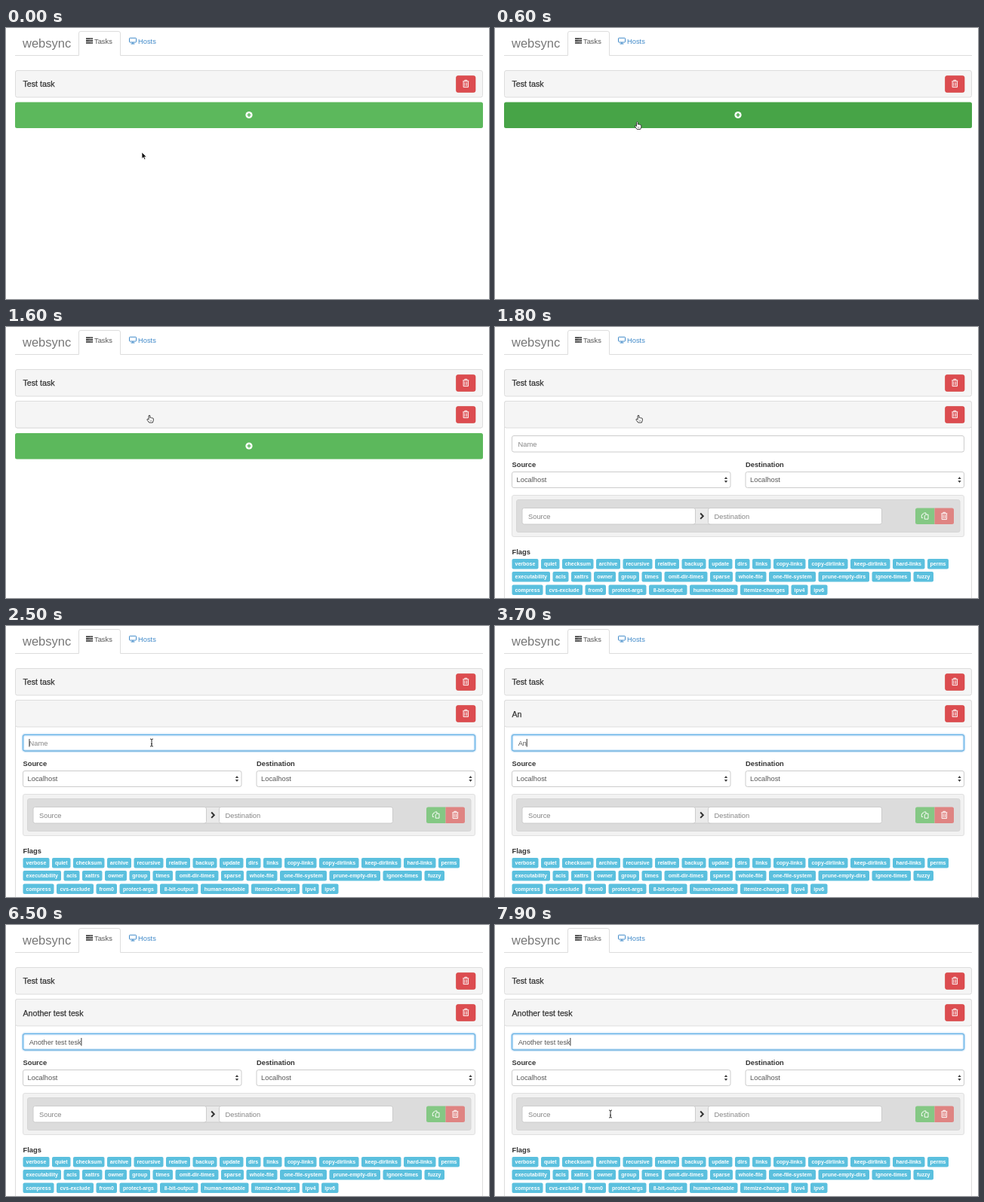
Recreate the animation shown at these times as an HTML page. Size 640 by 360 pixels, loop 8000 ms.

```html
<!DOCTYPE html>
<html lang="en">
<head>
<meta charset="utf-8">
<title>websync</title>
<style>
html, body { margin: 0; width: 100%; height: 100%; overflow: hidden; background: #fff; }
svg { display: block; }
text { font-family: "Liberation Sans", Arial, sans-serif; white-space: pre; }
</style>
</head>
<body>
<svg id="stage" width="100%" height="100%" viewBox="0 0 640 360"></svg>
<script>
const LOOP = 8000, FRAME = 100, BODY_TOP = 134, BODY_HEIGHT = 330;
const GREEN = '#5cb85c', GREEN_HOVER = '#47a447', RED = '#dc4c50', BORDER = '#ddd';

const TITLE = 'Another test tesk';
const KEY_TIMES = [3300, 3700, 3900, 4000, 4200, 4300, 4500, 4600, 4800,
  5000, 5200, 5300, 5700, 5900, 6100, 6300, 6500];
const FOCUS_TIME = 2300, CARET_TIME = 2600;

// Each flag row: top, names, left edges followed by the right end
const FLAGS = [
  [308, 'verbose quiet checksum archive recursive relative backup update dirs links copy-links copy-dirlinks keep-dirlinks hard-links perms',
    [22.5, 61, 89, 134, 169.5, 212, 247.5, 283, 318, 341, 369, 415, 471, 527, 573, 604.5]],
  [325, 'executability acls xattrs owner group times omit-dir-times sparse whole-file one-file-system prune-empty-dirs ignore-times fuzzy',
    [22.5, 76.5, 101, 131, 163.5, 194.5, 224.5, 285, 318.5, 363, 428.5, 499.5, 554.5, 584.5]],
  [342.5, 'compress cvs-exclude from0 protect-args 8-bit-output human-readable itemize-changes ipv4 ipv6',
    [22.5, 67, 119.5, 150.5, 204, 258, 325, 392.5, 418, 444]]
];

const rect = (x, y, w, h, fill, stroke = 'none', rx = 2.5, more = '') =>
  `<rect x="${x}" y="${y}" width="${w}" height="${h}" rx="${rx}" fill="${fill}" stroke="${stroke}" ${more}/>`;
const text = (x, y, str, size = 9.33, fill = '#555', more = '') =>
  `<text x="${x}" y="${y}" font-size="${size}" fill="${fill}" ${more}>${str}</text>`;
const path = (d, fill, stroke = 'none', width = 1, more = '') =>
  `<path d="${d}" fill="${fill}" stroke="${stroke}" stroke-width="${width}" ${more}/>`;
const group = (x, y, inner, more = '') => `<g transform="translate(${x} ${y})" ${more}>${inner}</g>`;

const label = (x, y, str) => text(x, y, str, 9.33, '#333', 'font-weight="bold"');
const heading = (y, str, id = '') =>
  text(22.5, y, str, 10.67, '#333', `stroke="#333" stroke-width=".25" id="${id}"`);
const field = (x, y, w, hint) => rect(x, y, w, 21.5, '#fff', '#ccc') + text(x + 8, y + 14, hint, 9.33, '#858585');

const trash = (x, y) => group(x, y,
  path('M-4 -3.2H4M-1.5 -3.4V-4.7H1.5V-3.4M-3.2 -2.8V4.6H3.2V-2.8M-1.2 -1.5V3.3M1.2 -1.5V3.3', 'none', '#fff', 0.95));
const trashButton = y => rect(596.5, y, 25.5, 22, RED, '#d43f3a', 2.5, 'stroke-width=".6"') + trash(609.3, y + 10.5);

const select = x => rect(x, 192.5, 289.5, 21, '#fff', '#ccc') + text(x + 6, 206, 'Localhost') +
  group(x + 283.5, 203, path('M-2.2 -1L0 -4L2.2 -1ZM-2.2 1L0 4L2.2 1Z', '#444'));

const flags = FLAGS.map(([y, names, edges]) => names.split(' ').map((name, i) => {
  const w = edges[i + 1] - edges[i] - 3.5;
  return rect(edges[i], y, w, 13.5, '#5bc0de', 'none', 2) +
    text(edges[i] + w / 2, y + 9.2, name, 7, '#fff', 'font-weight="bold" text-anchor="middle"');
}).join('')).join('');

const header =
  path('M12 36.5H96.5V7Q96.5 4.5 99 4.5H149Q151.5 4.5 151.5 7V36.5H632', 'none', BORDER) +
  text(22, 26, 'websync', 16.5, '#777') +
  path('M106 14.2H115M106 17H115M106 19.8H115', 'none', '#444', 2) +
  path('M111 14.2H114M109.5 17H114M112 19.8H114', 'none', '#999', 0.6) +
  text(117, 20.5, 'Tasks') +
  rect(163.5, 13.3, 9, 5.7, 'none', '#428bca', 0.8) + path('M165.5 21H170.5M168 19V21', 'none', '#428bca', 1.2) +
  text(175, 20.5, 'Hosts', 9.33, '#428bca');

const panelHead = y => rect(12.5, y, 619, 35.5, '#f5f5f5', BORDER) + trashButton(y + 7);

const form =
  field(22.5, 144.5, 599, '<tspan id="hint">Name</tspan>') +
  `<g id="focus">${rect(22.5, 144.5, 599, 21.5, 'none', '#66afe9', 3, 'stroke-width="4" opacity=".3"')}
  ${rect(22.5, 144.5, 599, 21.5, 'none', '#5aaee6')}</g>` +
  text(30.7, 158.5, '', 9.2, '#555', 'id="typed"') + rect(0, 150, 0.9, 10.5, '#222', 'none', 0, 'id="caret"') +
  label(22.5, 185.5, 'Source') + label(332, 185.5, 'Destination') + select(22.5) + select(332) +
  rect(22.5, 223.5, 599, 55, '#f2f2f2', '#e0e0e0') + rect(28.5, 229.5, 587.5, 43, '#dcdcdc', '#d6d6d6') +
  rect(262, 240.5, 24, 21.5, '#eaeaea', '#ccc', 0) +
  field(36, 240.5, 229.5, 'Source') + field(282.5, 240.5, 230, 'Destination') +
  path('M272.2 247.5L275.8 251.2L272.2 254.9', 'none', '#333', 2) +
  path('M559.5 240.5H582.5V262H559.5Q557 262 557 259.5V243Q557 240.5 559.5 240.5Z', '#84c884') +
  path('M582.5 240.5H605.5Q608 240.5 608 243V259.5Q608 262 605.5 262H582.5Z', '#df8482') +
  path('M567 248.5L568.5 247H571V249M567 248.5V249.5M567 253.5H565.3V249.8L567 248.2M569.2 251L571 249.2H574V255.2H569.2Z', 'none', '#fff', 0.95) +
  trash(595.3, 251) +
  label(22.5, 301.5, 'Flags') + flags;

const cursors = {
  arrow: path('M0 0V8.6L2 6.8L3.4 9.8L4.9 9.1L3.5 6.2H6.2Z', '#111', '#fff', 0.7),
  hand: path('M-.9 .8Q0 -.6 .9 .8V3.6Q1.8 2.8 2.5 3.9Q3.4 3.2 4 4.2Q5.2 3.7 5.3 5V7.2L4.3 10H-.3L-3 6.3Q-3.2 4.8 -1.7 5.3L-.9 6.1Z', '#fff', '#222', 0.85) +
    path('M1 6.5V8.5M2.6 6.5V8.5', 'none', '#444', 0.5),
  beam: path('M-2 -5Q0 -5 0 -3.8Q0 -5 2 -5M0 -4V4M-2 5Q0 5 0 3.8Q0 5 2 5M-1 1.7H1', 'none', '#222', 0.95)
};

stage.innerHTML = header + panelHead(56.5) + heading(78, 'Test task') +
  `<g id="panel">${rect(12.5, 98.5, 619, 35.5, '#fff', BORDER, 2.5, 'id="frame"')}
  ${panelHead(98.5)}${heading(120.5, '', 'title')}
  <svg id="panelBody" y="${BODY_TOP}" width="640" height="0">${group(0, -BODY_TOP, form)}</svg></g>` +
  `<g id="add">${rect(12, 98.5, 620, 34.5, GREEN, 'none', 2.5, 'id="addFace"')}
  <circle cx="322" cy="115.5" r="4.6" fill="#fff"/>
  ${path('M322 113V118M319.5 115.5H324.5', 'none', GREEN, 1.5, 'id="plus"')}
  ${rect(12, 98.5, 620, 34.5, 'none', '#68a6d8', 2.5, 'stroke-width="1.9" id="ring"')}</g>` +
  `<g id="cursor">${Object.entries(cursors).map(([k, v]) => `<g id="${k}">${v}</g>`).join('')}</g>`;

const $ = id => document.getElementById(id);
const show = (id, on) => $(id).setAttribute('display', on ? 'inline' : 'none');
const set = (id, attrs) => { for (const k in attrs) $(id).setAttribute(k, attrs[k]); };
const progress = (t, from, to) => Math.min(1, Math.max(0, (t - from) / (to - from)));
const smooth = p => p * p * (3 - 2 * p);

// Cursor moves: start, end, x0, y0, x1, y1
const MOVES = [
  [0, 800, 180, 165, 190, 117],
  [1800, 2200, 190, 117, 193, 155],
  [7200, 7800, 193, 155, 153, 251]
];

function cursorAt(t) {
  const [a, b, x0, y0, x1, y1] = MOVES.filter(m => t >= m[0]).pop();
  const p = smooth(progress(t, a, b));
  return [x0 + (x1 - x0) * p, y0 + (y1 - y0) * p];
}

function draw(t) {
  const added = t >= 1300;
  const p = progress(t, 1600, 1950);
  const open = BODY_HEIGHT * (1 - (1 - p) ** 2);
  const [x, y] = cursorAt(t);

  show('panel', added);
  set('frame', { height: 35.5 + open });
  set('panelBody', { height: open });

  const face = !added && y < 133 ? GREEN_HOVER : GREEN;
  set('add', { transform: `translate(0 ${added ? 42.5 + open : 0})` });
  set('addFace', { fill: face });
  set('plus', { stroke: face });
  show('ring', t >= 1000 && !added);

  const count = KEY_TIMES.filter(k => k <= t).length;
  const str = TITLE.slice(0, count);
  $('title').textContent = $('typed').textContent = str;
  show('hint', !count);
  show('focus', t >= FOCUS_TIME);
  const since = t - (count ? KEY_TIMES[count - 1] : CARET_TIME);
  show('caret', t >= FOCUS_TIME && (since < 0 || since % 1000 < 500));
  set('caret', { x: 30.5 + (count ? $('typed').getComputedTextLength() : 0) });

  const inField = open && (y > 144 && y < 166 || y > 240 && y < 262);
  const kind = inField ? 'beam' : y < 134 ? 'hand' : 'arrow';
  for (const k in cursors) show(k, k === kind);
  show('cursor', t < KEY_TIMES[0] || t >= 7300);
  set('cursor', { transform: `translate(${x} ${y})` });
}

function tick(now) {
  draw(Math.floor(now % LOOP / FRAME) * FRAME);
  requestAnimationFrame(tick);
}
draw(0);
requestAnimationFrame(tick);
</script>
</body>
</html>
```
